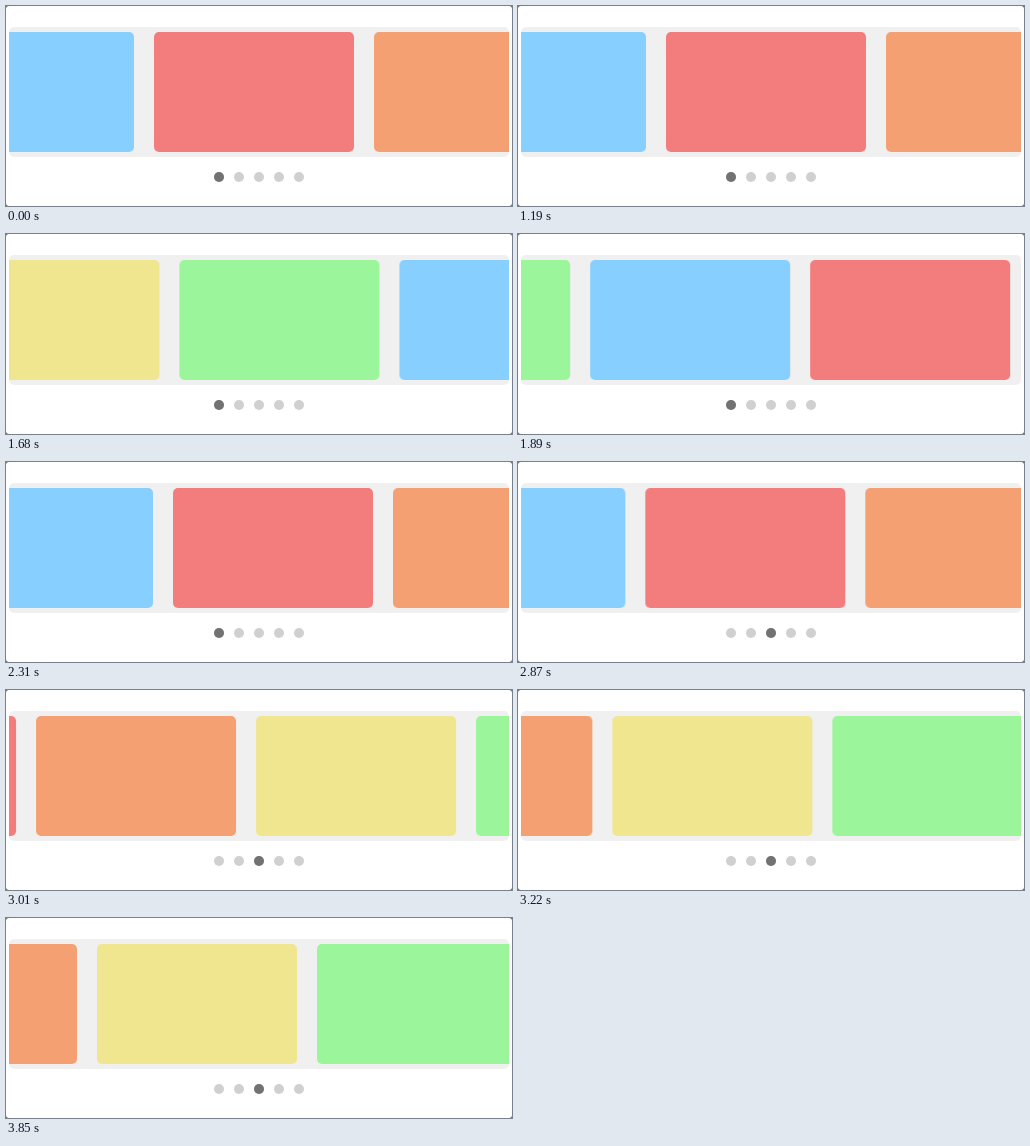
Animation of 506 by 200 pixels, one loop 3920 ms. Source, as an HTML page:

```html
<!DOCTYPE html>
<html lang="en">
<head>
<meta charset="utf-8">
<title>Roulette carousel</title>
<style>
  html, body { margin: 0; width: 100%; height: 100%; overflow: hidden; background: #666; }
  .stage { position: relative; width: 506px; height: 200px; border-radius: 3px; background: #fff; overflow: hidden; }
  .view { position: absolute; left: 3px; top: 21px; width: 500px; height: 130px; border-radius: 5px; background: #f0f0f0; overflow: hidden; }
  .track { position: absolute; left: -75px; top: 5px; display: flex; gap: 20px; }
  .track i { flex: none; width: 200px; height: 120px; border-radius: 5px; }
  .dots { position: absolute; left: 208px; top: 166px; display: flex; gap: 10px; }
  .dots i { width: 10px; height: 10px; border-radius: 50%; background: #d0d0d0; }
  .dots .on { position: absolute; left: 0; background: #727272; }

  /* The script moves the paused timeline through --t */
  .track, .on { animation: spin 3920ms linear var(--t, 0ms) infinite paused; }
  .on { animation-name: pick; animation-timing-function: step-end; }
  @keyframes spin {
    0% { transform: translateX(0); }
    30.357% { transform: translateX(0); animation-timing-function: ease; }
    55.714% { transform: translateX(-2181px); }
    66.097% { transform: translateX(-2181px); animation-timing-function: ease; }
    83.189%, 100% { transform: translateX(-3797px); }
  }
  @keyframes pick {
    0% { transform: translateX(0); }
    66.06%, 100% { transform: translateX(40px); }
  }
</style>
</head>
<body>
<div class="stage">
  <div class="view"><div class="track"></div></div>
  <div class="dots"><i></i><i></i><i></i><i></i><i></i><i class="on"></i></div>
</div>
<script>
  const colors = ['#87cfff', '#f37c7c', '#f5a072', '#f0e68f', '#9bf59b'];
  const track = document.querySelector('.track');
  for (let i = 0; i < 22; i++) {
    const slide = document.createElement('i');
    slide.style.background = colors[i % colors.length];
    track.append(slide);
  }

  const STEP = 70, LOOP = 3920;
  const start = performance.now();
  function tick() {
    // small lead so a step is never shown late
    const t = Math.floor((performance.now() - start + 6) / STEP) * STEP % LOOP;
    document.documentElement.style.setProperty('--t', -t + 'ms');
    requestAnimationFrame(tick);
  }
  tick();
</script>
</body>
</html>
```
